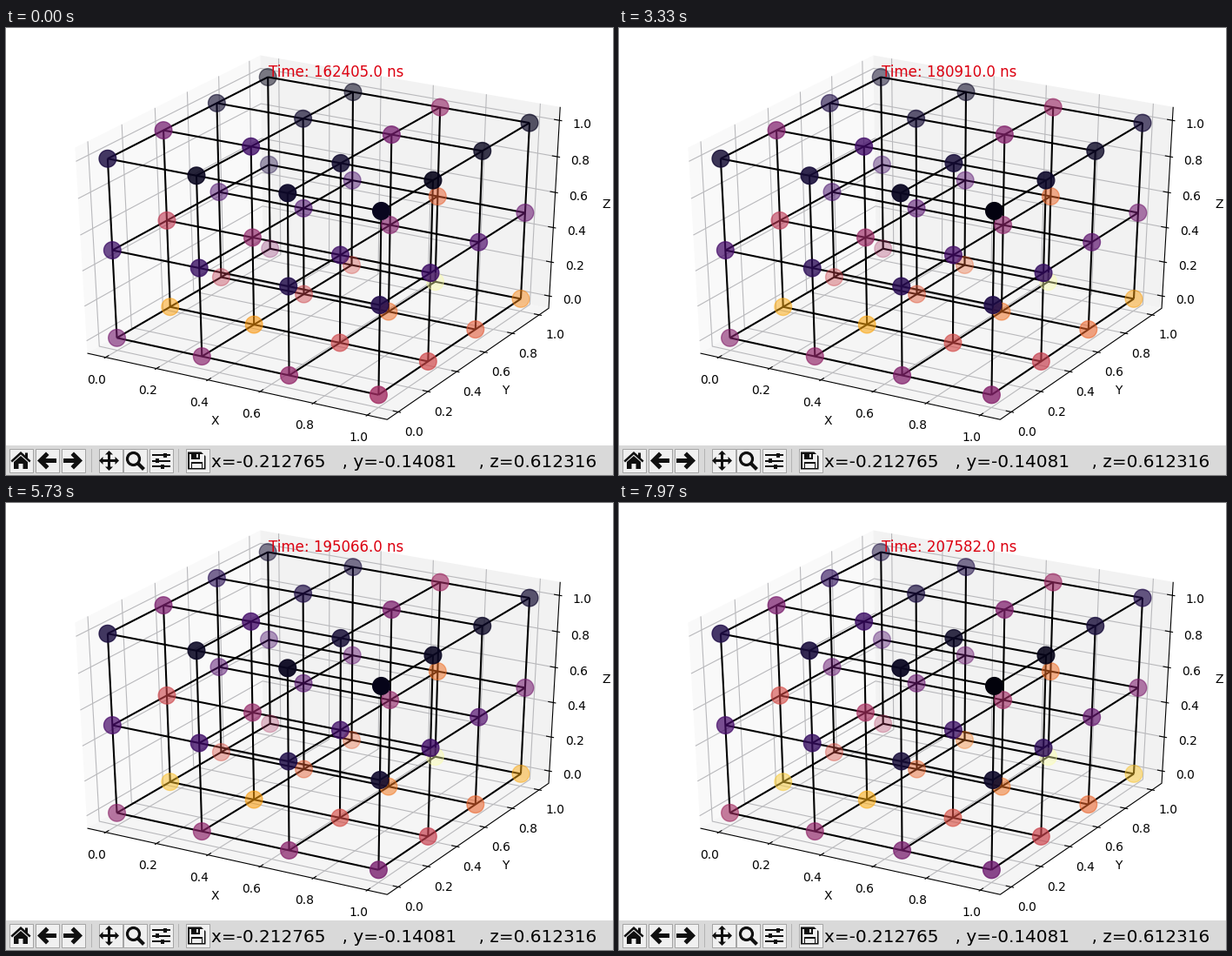
Write a matplotlib script that moves like this. It is 698 px wide and 514 px high and loops after 8 s.

```python
import numpy as np
import matplotlib.pyplot as plt
from matplotlib.animation import FuncAnimation
from matplotlib.collections import LineCollection
from matplotlib.patches import Circle, Polygon, Rectangle

W, H, DPI = 698, 514, 100
FRAMES, LOOP = 240, 8000
LO, HI = -0.0729, 1.0729
ELEV, AZIM = np.radians(30), np.radians(-60)
INK, BUTTON = "#101010", "#f0f0f0"

# The simulated clock runs at a slightly uneven pace
CLOCK_AT = [0, 36, 62, 99, 147, 195, 239]
CLOCK_NS = [162405, 168843, 173691, 180910, 190548, 199585, 207582]


def project(p):
    """Screen position and distance of points in data space."""
    x, y, z = np.moveaxis((np.asarray(p, float) - 0.5) / (HI - LO), -1, 0)
    ahead = np.cos(AZIM) * x + np.sin(AZIM) * y
    right = -np.sin(AZIM) * x + np.cos(AZIM) * y
    up = np.cos(ELEV) * z - np.sin(ELEV) * ahead
    dist = 10 - np.cos(ELEV) * ahead - np.sin(ELEV) * z
    xy = np.stack([362.9 + 3980 * right / dist, 233.7 - 2700 * up / dist], -1)
    return xy, dist


def flat(p):
    return project(p)[0]


fig = plt.figure(figsize=(W / DPI, H / DPI), dpi=DPI, facecolor="white")
ax = fig.add_axes([0, 0, 1, 1])
ax.set_xlim(0, W)
ax.set_ylim(H, 0)
ax.axis("off")


def label(x, y, s, pt=10, ha="center", color="black", z=6):
    base = y + 0.365 * pt * DPI / 72
    return ax.text(x, base, s, size=pt, ha=ha, va="baseline", color=color,
                   family="DejaVu Sans", zorder=z)


def strokes(segments, color, pt, z):
    ax.add_collection(LineCollection([flat(s) for s in segments], colors=color,
                                     linewidths=pt, zorder=z))


def poly(points, color, z=8):
    ax.add_patch(Polygon(points, facecolor=color, zorder=z))


def box(x, y, w, h, color, z=8, **kw):
    ax.add_patch(Rectangle((x, y), w, h, facecolor=color, zorder=z, **kw))


def draw_space():
    walls = [
        ([(LO, LO, LO), (LO, HI, LO), (LO, HI, HI), (LO, LO, HI)], "#f9f9f9"),
        ([(LO, HI, LO), (HI, HI, LO), (HI, HI, HI), (LO, HI, HI)], "#f2f2f2"),
        ([(LO, LO, LO), (HI, LO, LO), (HI, HI, LO), (LO, HI, LO)], "#f5f5f5"),
    ]
    for corners, color in walls:
        poly(flat(corners), color, 0)

    grid, ticks = [], []
    for t in np.linspace(0, 1, 6):
        grid += [
            [(t, LO, LO), (t, HI, LO), (t, HI, HI)],
            [(HI, t, LO), (LO, t, LO), (LO, t, HI)],
            [(LO, LO, t), (LO, HI, t), (HI, HI, t)],
        ]
        ticks += [
            [(t, LO - 0.01, LO), (t, LO + 0.02, LO)],
            [(HI + 0.01, t, LO), (HI - 0.02, t, LO)],
            [(HI + 0.01, HI, t), (HI - 0.02, HI, t)],
        ]
        for spot, dx, dy in [((t, LO, LO), -10.2, 24.8),
                             ((HI, t, LO), 18, 22.5),
                             ((HI, HI, t), 26.5, 3.5)]:
            x, y = flat(spot)
            label(x + dx, y + dy, f"{t:.1f}")
    strokes(grid, "#b9b9bc", 0.8, 1)
    axes = [[(LO, LO, LO), (HI, LO, LO), (HI, HI, LO), (HI, HI, HI)]]
    strokes(axes + ticks, "black", 0.8, 2)
    label(240, 451, "X")
    label(574, 416, "Y")
    label(690, 202, "Z")


def draw_lattice():
    thirds = np.linspace(0, 1, 4)
    layers = (0, 0.5, 1)
    rods = [[(0, y, z), (1, y, z)] for y in thirds for z in layers]
    rods += [[(x, 0, z), (x, 1, z)] for x in thirds for z in layers]
    rods += [[(x, y, 0), (x, y, 1)] for x in thirds for y in thirds]
    strokes(rods, "black", 1.5, 3)


def arrow(cx, cy, way):
    half = [(-11, 0), (-1, -10), (2.5, -6.5), (-1.5, -2.5), (11, -2.5)]
    pts = half + [(x, -y) for x, y in half[:0:-1]]
    poly([(cx + way * x, cy + y) for x, y in pts], INK)


def draw_toolbar():
    box(0, 480, W, H - 480, "#d9d9d9", 7)
    for x in (3, 33, 63, 106, 134, 164, 206):
        box(x + 0.5, 483.5, 27, 27, BUTTON, edgecolor="#a4a4a4", linewidth=0.7)
    for x in (98, 198):
        box(x, 484, 1, 27, "#b4b4b4")
    cy = 497.5

    # home
    poly([(5.5, cy), (17, cy - 10.5), (22, cy - 6), (22, cy - 9), (25, cy - 9),
          (25, cy - 3), (28.5, cy), (27, cy + 2), (17, cy - 7), (7, cy + 2)], INK)
    poly([(9, cy + 1.5), (17, cy - 5.5), (25, cy + 1.5), (25, cy + 9.5),
          (19.5, cy + 9.5), (19.5, cy + 3.5), (14.5, cy + 3.5),
          (14.5, cy + 9.5), (9, cy + 9.5)], INK)

    arrow(47, cy, 1)
    arrow(77, cy, -1)

    # pan
    cx = 118.5
    box(cx - 9, cy - 1.5, 18, 3, INK)
    box(cx - 1.5, cy - 9, 3, 18, INK)
    for dx, dy in [(1, 0), (-1, 0), (0, 1), (0, -1)]:
        poly([(cx + 11.5 * dx, cy + 11.5 * dy),
              (cx + 7 * dx - 4.5 * dy, cy + 7 * dy + 4.5 * dx),
              (cx + 7 * dx + 4.5 * dy, cy + 7 * dy - 4.5 * dx)], INK)

    # zoom
    ax.add_patch(Circle((146.5, cy - 2), 7, fill=False, edgecolor=INK,
                        linewidth=2.3, zorder=8))
    ax.plot([152, 157], [cy + 3.5, cy + 8.5], color=INK, linewidth=3, zorder=8)

    # sliders
    for dy, knob in [(-6.5, 13), (0, 4), (6.5, 10)]:
        box(167.5, cy + dy - 1, 21, 2, INK)
        box(167.5 + knob, cy + dy - 2.5, 4.5, 5, INK)

    # disk
    poly([(209, cy - 10), (224.5, cy - 10), (229.5, cy - 5), (229.5, cy + 10),
          (209, cy + 10)], INK)
    box(211, cy - 8, 16.5, 16, BUTTON)
    box(212.5, cy - 9, 10, 7, INK)
    box(218.5, cy - 8, 2.5, 4.5, BUTTON)
    box(212.5, cy + 1.5, 13.5, 8, INK)
    box(214, cy + 3, 10.5, 5, BUTTON)

    label(236, 497.5, "x=-0.212765   , y=-0.14081    , z=0.612316",
          14.4, "left", z=9)


draw_space()
draw_lattice()
draw_toolbar()

thirds = np.linspace(0, 1, 4)
cells = np.stack(np.meshgrid(thirds, thirds, [0, 0.5, 1]), -1).reshape(-1, 3)
spots, depth = project(cells)
order = np.argsort(-depth)
cells, spots, depth = cells[order], spots[order], depth[order]
alpha = 1 - 0.7 * (depth - depth.min()) / np.ptp(depth)
X, Y, Z = cells.T

rng = np.random.default_rng(7)
phase = rng.uniform(0, 2 * np.pi, len(cells))
turns = rng.uniform(2, 6, len(cells))

nodes = ax.scatter(spots[:, 0], spots[:, 1], s=200, linewidths=1, zorder=4,
                   color="black")
clock = label(301.5, 50, "", 12, "left", "#dc0010")


def bump(cx, cy, wx, wy):
    return np.exp(-((X - cx) / wx) ** 2 - ((Y - cy) / wy) ** 2)


def heat(t):
    """Warm floor, two hot columns that narrow upwards, a slow drift."""
    low = 1 - Z
    floor = 0.06 + low ** 2 * (0.22 + 0.14 * X + 0.1 * Y
                               + 0.12 * np.sin(np.pi * Y))
    wide = 0.34 - 0.17 * Z
    left = (0.42 + 0.04 * Z) * bump(0.13, 0.33, wide, 0.23)
    back = (0.43 + 0.09 * low) * bump(0.7, 1.05 - 0.2 * Z, wide, 0.3)
    drift = 0.1 * t * (1 - 2 * X * (1 - Y)) * (1 - 0.6 * Z)
    wander = 0.02 * np.sin(2 * np.pi * turns * t + phase)
    return np.clip(floor + left + back + drift + wander, 0.02, 1)


def update(k):
    rgba = plt.cm.inferno(heat(k / (FRAMES - 1)))
    rgba[:, 3] = alpha
    nodes.set_facecolor(rgba)
    nodes.set_edgecolor(rgba)
    ns = round(float(np.interp(k, CLOCK_AT, CLOCK_NS)))
    clock.set_text(f"Time: {ns}.0 ns")
    return nodes, clock


anim = FuncAnimation(fig, update, frames=FRAMES, interval=LOOP / FRAMES,
                     init_func=lambda: update(0), repeat=True, repeat_delay=0,
                     blit=False)
plt.show()
```
